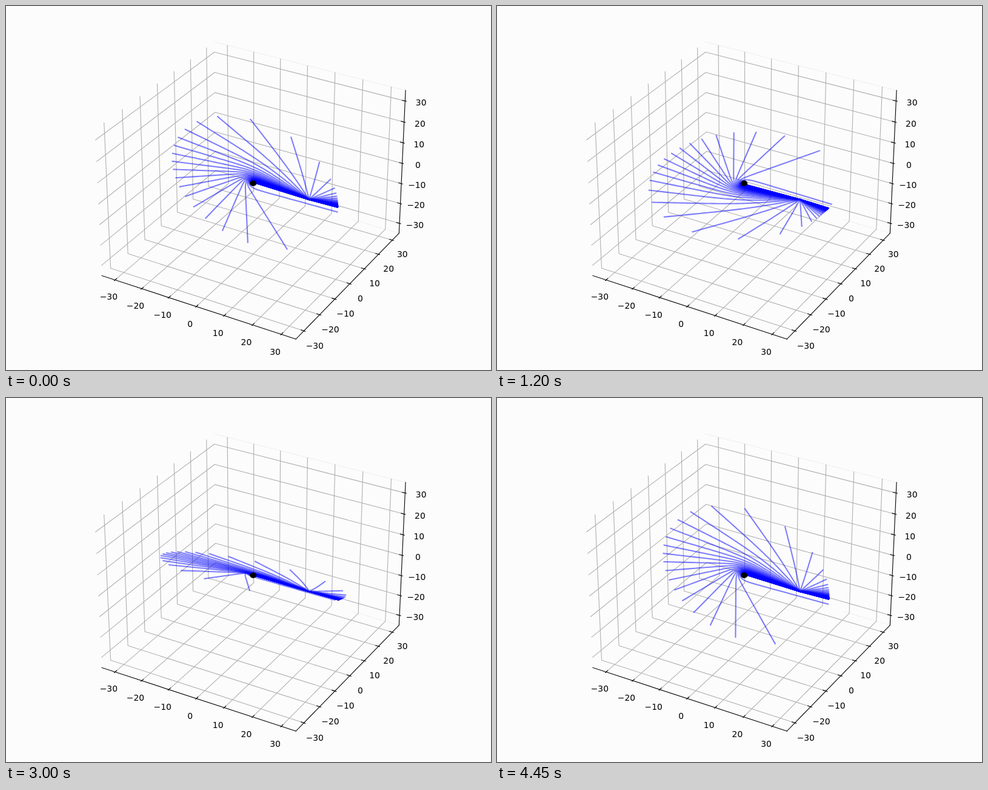
An HTML page that plays this animation: 800 px wide and 600 px high, repeating every 4500 ms.

```html
<!DOCTYPE html>
<html lang="en">
<head>
<meta charset="utf-8">
<title>Light rays around a black hole</title>
<style>
  html, body { margin: 0; width: 100%; height: 100%; overflow: hidden; background: #fcfcfc; }
  svg { display: block; width: 800px; height: 600px; }
  path { fill: none; }
  text { font: 13.889px "DejaVu Sans", sans-serif; text-anchor: middle; }
  .pane { stroke: #f1f1f1; stroke-width: 1.2; }
  .grid { stroke: #b0b0b0; stroke-width: 1.11; stroke-linejoin: round; }
  .axis { stroke: #000; stroke-width: 1.11; stroke-linecap: square; }
  .tick { stroke: #000; stroke-width: 1.11; }
  .ray { stroke: #00f; stroke-opacity: .5; stroke-width: 2.083; stroke-linecap: square; stroke-linejoin: round; }
</style>
</head>
<body>
<svg id="stage" viewBox="0 0 800 600"></svg>
<script>
const stage = document.getElementById('stage');

// Scene: axis limits in data units, half sizes of the view box
const LIMIT = 33.6;
const HALF = [4 / 7, 4 / 7, 3 / 7];
const EDGE = HALF.map(h => h * 25 / 24);
const STEP = HALF.map(h => h / 6);

// Rays: source distance, outer radius, horizon radius, count
const SOURCE = 20, OUTER = 30, HORIZON = 1, COUNT = 200;
const FRAMES = 90, FRAME_MS = 50;

function add(name, attrs, text) {
  const el = document.createElementNS('http://www.w3.org/2000/svg', name);
  for (const key in attrs) el.setAttribute(key, attrs[key]);
  if (text) el.textContent = text;
  stage.appendChild(el);
  return el;
}

// Perspective view: elevation 30 degrees, azimuth -60 degrees, distance 10
const C = Math.sqrt(3) / 2;
function project([x, y, z]) {
  const right = C * x + y / 2;
  const up = -x / 4 + C / 2 * y + C * z;
  const near = C / 2 * x - 0.75 * y + z / 2;
  const scale = 570 / 0.185 / (10 - near);
  return [407.7 + right * scale, 292.3 - up * scale];
}

const toWorld = (value, i) => value * HALF[i] / LIMIT;

function pathOf(points) {
  return 'M' + points.map(p => project(p).map(n => n.toFixed(2)).join(' ')).join('L');
}

const line = (cls, ...points) => add('path', { class: cls, d: pathOf(points) });

function drawAxes() {
  const [ex, ey, ez] = EDGE;
  line('pane', [-ex, ey, ez], [ex, ey, ez]);
  line('pane', [ex * 0.5, ey, -ez], [ex, ey, -ez]);

  // For each axis: the edge it runs along, and the back corners its grid lines visit
  const axes = [
    { edge: [0, -ey, -ez], via: [[0, ey, -ez], [0, ey, ez]], dir: 1 },
    { edge: [ex, 0, -ez], via: [[-ex, 0, -ez], [-ex, 0, ez]], dir: 0 },
    { edge: [ex, ey, 0], via: [[-ex, ey, 0], [-ex, -ey, 0]], dir: 0 }
  ];
  const at = (p, i, v) => p.map((n, j) => j === i ? v : n);
  const values = [-30, -20, -10, 0, 10, 20, 30];

  axes.forEach(({ edge, via }, i) => {
    for (const value of values) {
      const v = toWorld(value, i);
      line('grid', ...[edge, ...via].map(p => at(p, i, v)));
    }
  });

  axes.forEach(({ edge, dir }, i) => {
    line('axis', at(edge, i, -EDGE[i]), at(edge, i, EDGE[i]));
    for (const value of values) {
      const p = at(edge, i, toWorld(value, i));
      const out = Math.sign(p[dir]) * STEP[dir];
      line('tick', at(p, dir, p[dir] + 0.1 * out), at(p, dir, p[dir] - 0.2 * out));
      const [x, y] = project(p.map((n, j) => j === i ? n : n + Math.sign(n) * 0.6725 * STEP[j]));
      add('text', { x: x.toFixed(2), y: (y + 10.9).toFixed(2) }, String(value).replace('-', '\u2212'));
    }
  });
}

// Null geodesic u'' = -u + 1.5 u^2 with u = 1/r, integrated over the polar angle.
// Returns points [along the axis, away from the axis].
function trace(slope) {
  const h = 0.025;
  const force = u => -u + 1.5 * u * u;
  const points = [[SOURCE, 0]];
  const push = (u, phi) => points.push([Math.cos(phi) / u, Math.sin(phi) / u]);
  let u = 1 / SOURCE, p = slope;
  for (let phi = 0; phi < 20; phi += h) {
    const a1 = force(u);
    const p2 = p + a1 * h / 2, a2 = force(u + p * h / 2);
    const p3 = p + a2 * h / 2, a3 = force(u + p2 * h / 2);
    const p4 = p + a3 * h, a4 = force(u + p3 * h);
    const next = u + h / 6 * (p + 2 * p2 + 2 * p3 + p4);
    const stop = next < 1 / OUTER ? 1 / OUTER : next > HORIZON ? HORIZON : 0;
    if (stop) {
      push(stop, phi + h * (stop - u) / (next - u));
      break;
    }
    p += h / 6 * (a1 + 2 * a2 + 2 * a3 + a4);
    u = next;
    push(u, phi + h);
  }
  return points;
}

drawAxes();
const rays = Array.from({ length: COUNT }, (_, i) => ({
  points: trace(-2 + 4 * i / (COUNT - 1)),
  el: add('path', { class: 'ray' })
}));
add('ellipse', { cx: 407.7, cy: 292.3, rx: 5.5, ry: 4.7 });

// The plane of the rays turns about the line from source to hole
function draw(frame) {
  const angle = frame / FRAMES * 2 * Math.PI;
  const sin = Math.sin(angle), cos = Math.cos(angle);
  for (const { points, el } of rays) {
    el.setAttribute('d', pathOf(points.map(([x, d]) => [x, -d * sin, d * cos].map(toWorld))));
  }
}

const start = performance.now();
let shown = -1;
function tick() {
  const frame = Math.floor((performance.now() - start) / FRAME_MS) % FRAMES;
  if (frame !== shown) draw(shown = frame);
  requestAnimationFrame(tick);
}
tick();
</script>
</body>
</html>
```
